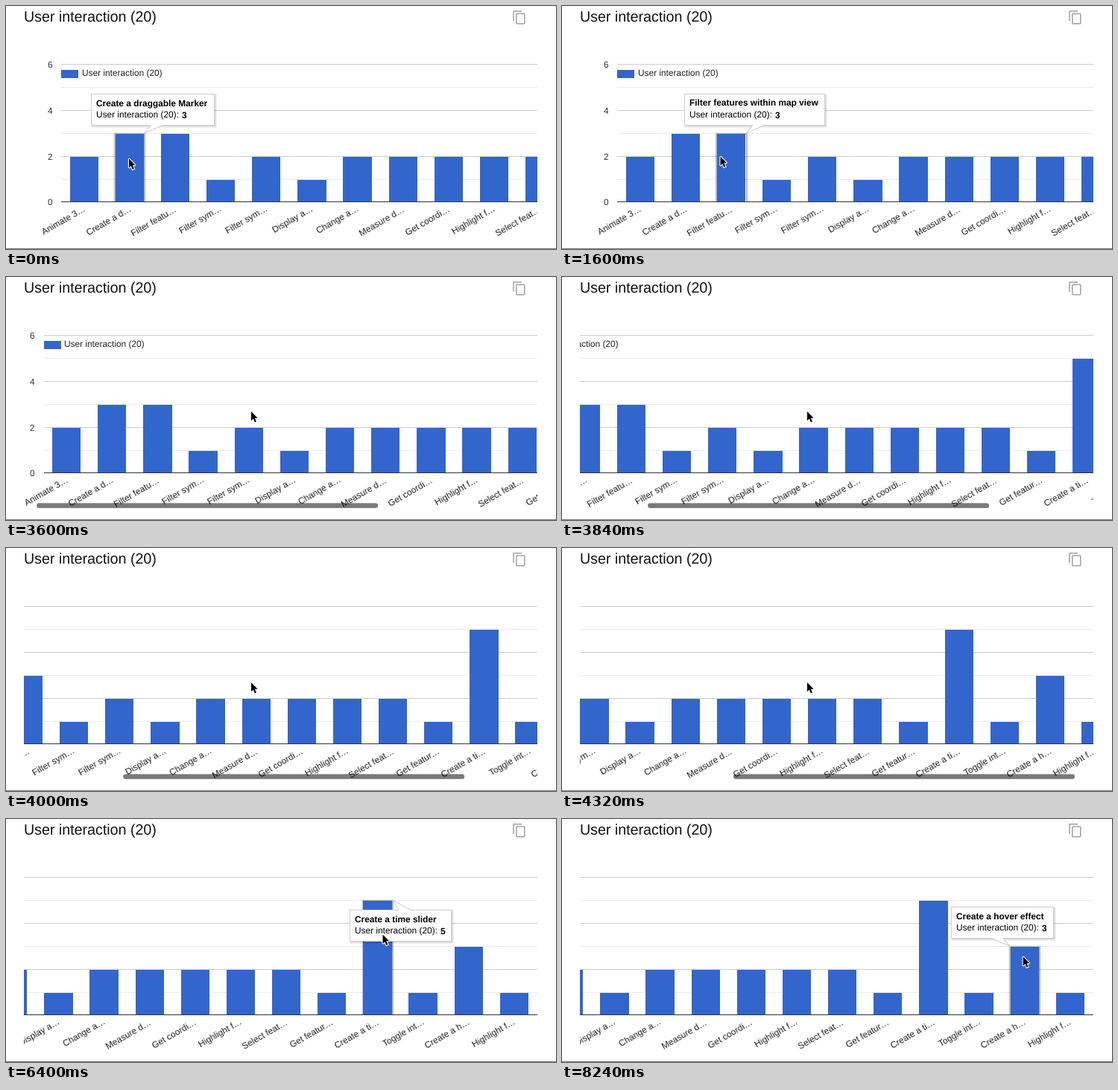
These frames come from a looping animation (738 by 327 pixels, 8.96 s). A matplotlib script:

```python
import math

import matplotlib.pyplot as plt
import numpy as np
from matplotlib.animation import FuncAnimation
from matplotlib.patches import FancyBboxPatch, Polygon, Rectangle
from matplotlib.transforms import Affine2D

W, H, DPI = 738, 327, 64
STEP, LOOP = 80, 8960
PX = 72 / DPI                      # points per pixel

plt.rcParams.update({"font.family": "Liberation Sans", "text.hinting": "none",
                     "toolbar": "None"})

BLUE = "#3366cc"
SERIES = "User interaction (20)"
FONT = 11.9
VIEW_L, VIEW_R = 24, 713
PLOT_L, PLOT_R = 74, 1062
BAR_X, BAR_STEP, BAR_W = 85.5, 61.15, 38.3

BARS = [("Animate 3…", 2), ("Create a d…", 3), ("Filter featu…", 3),
        ("Filter sym…", 1), ("Filter sym…", 2), ("Display a…", 1),
        ("Change a…", 2), ("Measure d…", 2), ("Get coordi…", 2),
        ("Highlight f…", 2), ("Select feat…", 2), ("Get featur…", 1),
        ("Create a ti…", 5), ("Toggle int…", 1), ("Create a h…", 3),
        ("Highlight f…", 1)]

# bar index: tooltip title and tooltip width
TIPS = {1: ("Create a draggable Marker", 165),
        2: ("Filter features within map view", 188),
        12: ("Create a time slider", 136),
        14: ("Create a hover effect", 137)}

# pointer moves: start ms, end ms, destination
START = (165, 205.5)
MOVES = [(400, 1040, (212.5, 202.5)), (2640, 3280, (329, 181)),
         (4480, 4960, (472, 156.5)), (5280, 5520, (505.5, 155.5)),
         (7200, 8000, (626, 174)), (8160, 8240, (618.7, 185.3))]

SCROLL_T = np.arange(3360, 4401, STEP)
SCROLL_X = [0, 2, 9, 23.5, 55, 95, 134, 168, 197, 225, 252, 279, 305.8, 340]

fig = plt.figure(figsize=(W / DPI, H / DPI), dpi=DPI, facecolor="white")
ax = fig.add_axes([0, 0, 1, 1])
ax.set(xlim=(0, W), ylim=(H, 0))
ax.axis("off")

scroll = Affine2D()
moving = scroll + ax.transData
view = Rectangle((VIEW_L, 0), VIEW_R - VIEW_L, H, transform=ax.transData)
plot_area = Rectangle((VIEW_L, 40), VIEW_R - VIEW_L, 224, transform=ax.transData)


def grid_row(value):
    return math.floor(263.9 - 30.83 * value)


def bar_left(i):
    return BAR_X + BAR_STEP * i


def rect(x, y, w, h, color, z, scrolls=False):
    patch = ax.add_patch(Rectangle((x, y), w, h, fc=color, lw=0, zorder=z))
    if scrolls:
        patch.set_transform(moving)
        patch.set_clip_path(view)
    return patch


def text(x, y, s, size=FONT, color="black", z=5, scrolls=False, **kw):
    label = ax.text(x, y, s, fontsize=size * PX, color=color, zorder=z,
                    va="baseline", **kw)
    if scrolls:
        label.set_transform(moving)
        label.set_clip_path(view)
        label.set_clip_on(True)
    return label


def draw_page():
    text(24.5, 21, SERIES, size=19.65, color="#111111")
    rect(0, 326, W, 1, "#7a7a7a", 5)
    gray = dict(color="#a6a6a6", lw=1.6 * PX)
    ax.plot([681.4, 681.4, 692.4], [19.6, 6.9, 6.9], solid_capstyle="butt", **gray)
    ax.add_patch(FancyBboxPatch(
        (684.8, 10.3), 11, 13.5, boxstyle="round,pad=0,rounding_size=0.9",
        fc="none", ec="#a6a6a6", lw=1.6 * PX))


def draw_chart():
    for v in range(1, 7):
        color = "#ebebeb" if v % 2 else "#cccccc"
        rect(PLOT_L, grid_row(v), PLOT_R - PLOT_L, 1, color, 1, True)
    for v in (0, 2, 4, 6):
        text(62, grid_row(v) + 5, str(v), color="#333333", scrolls=True, ha="right")
    rect(PLOT_L, 86, 23, 11, BLUE, 2, True)
    text(102, 95, SERIES, color="#222222", scrolls=True)
    for i, (name, v) in enumerate(BARS):
        top = grid_row(v) + 1
        rect(bar_left(i), top, BAR_W, 264 - top, BLUE, 3, True)
        text(bar_left(i) + BAR_W / 2 + 3, 275.5, name, color="#222222",
             scrolls=True, ha="right", rotation=30, rotation_mode="anchor")
    rect(PLOT_L, 263, PLOT_R - PLOT_L, 1, "#333333", 4, True)


def make_rings():
    rings = []
    for k, alpha in enumerate((0.34, 0.2, 0.08)):
        ring = ax.add_patch(Rectangle((0, 0), 1, 1, fc="none", ec="black",
                                      alpha=alpha, lw=PX, zorder=2.5))
        ring.set_clip_path(plot_area)
        rings.append((k + 0.5, ring))
    return rings


draw_page()
draw_chart()
rings = make_rings()

thumb = ax.add_patch(FancyBboxPatch(
    (0, 304.3), 458, 6.6, boxstyle="round,pad=0,rounding_size=3.3",
    fc="black", lw=0, zorder=6))

shadows = [rect(0, 0, 1, 1, "black", 7) for _ in range(3)]
bubble = ax.add_patch(Polygon([(0, 0), (1, 0), (1, 1)], fc="white", ec="#cccccc",
                              lw=PX, zorder=8))
tip_title = text(0, 0, "", z=9, weight="bold")
tip_series = text(0, 0, SERIES + ":", z=9)
tip_value = text(0, 0, "", z=9, weight="bold")
tip_parts = shadows + [bubble, tip_title, tip_series, tip_value]

ARROW = np.array([(0, 0), (0, 12.3), (2.8, 9.7), (4.8, 14.4), (6.9, 13.5),
                  (4.9, 8.9), (8.6, 8.7)])
arrow_edge = ax.add_patch(Polygon(ARROW, fc="white", ec="white", lw=2.2 * PX, zorder=10))
arrow = ax.add_patch(Polygon(ARROW, fc="black", lw=0, zorder=11))


def pointer_at(t):
    pos = np.array(START)
    for begin, end, goal in MOVES:
        p = min(max((t - begin) / (end - begin), 0), 1)
        pos = pos + (np.array(goal) - pos) * p * p * (3 - 2 * p)
    return pos


def hovered_bar(pos, offset):
    for i in TIPS:
        left = bar_left(i) - offset
        if left <= pos[0] <= left + BAR_W and pos[1] >= grid_row(BARS[i][1]):
            return i
    return None


def place_tooltip(i, offset):
    title, width = TIPS[i]
    value = BARS[i][1]
    left = bar_left(i) - offset
    top = grid_row(value) + 1

    for grow, ring in rings:
        ring.set_bounds(left - grow, top - grow, BAR_W + 2 * grow, 270 - top)

    # open to the right unless that would leave the view
    side = 1 if left + BAR_W + 11.5 + width / 2 < VIEW_R else -1
    tip_x = left + BAR_W + 1 if side > 0 else left - 1
    tip = (tip_x, top - 1)
    above = top > 150
    x0 = round(tip_x + side * 10.5 - width / 2) + 0.5
    y0 = (top - 54 if above else top + 12) + 0.5
    x1, y1 = x0 + width, y0 + 42
    near, far = sorted((tip_x + side * 8.5, tip_x + side * 24.5))

    if above:
        shape = [(x0, y0), (x1, y0), (x1, y1), (far, y1), tip, (near, y1), (x0, y1)]
    else:
        shape = [(x0, y0), (near, y0), tip, (far, y0), (x1, y0), (x1, y1), (x0, y1)]
    bubble.set_xy(shape)
    for k, shadow in enumerate(shadows):
        shadow.set_bounds(x0 + 1 - k, y0 + 1 - k, width + 2 * k, 42 + 2 * k)
        shadow.set_alpha(0.05)

    tip_title.set_text(title)
    tip_title.set_position((x0 + 6.5, y0 + 16.5))
    tip_series.set_position((x0 + 6.5, y0 + 32.5))
    tip_value.set_text(str(value))
    tip_value.set_position((x0 + 6.5 + 114.5, y0 + 32.5))


def update(frame):
    t = frame * STEP
    offset = float(np.interp(t, SCROLL_T, SCROLL_X))
    scroll.clear().translate(-offset, 0)

    thumb.set_x(25.4 + 0.669 * offset)
    thumb.set_alpha(np.interp(t, [4480, 4880], [0.52, 0]) if t >= 3440 else 0)

    pos = pointer_at(t)
    arrow.set_xy(ARROW + pos)
    arrow_edge.set_xy(ARROW + pos)

    bar = hovered_bar(pos, offset)
    if bar is not None:
        place_tooltip(bar, offset)
    for part in tip_parts + [ring for _, ring in rings]:
        part.set_visible(bar is not None)
    return []


anim = FuncAnimation(fig, update, frames=LOOP // STEP, interval=STEP,
                     repeat=True, blit=False)
plt.show()
```
